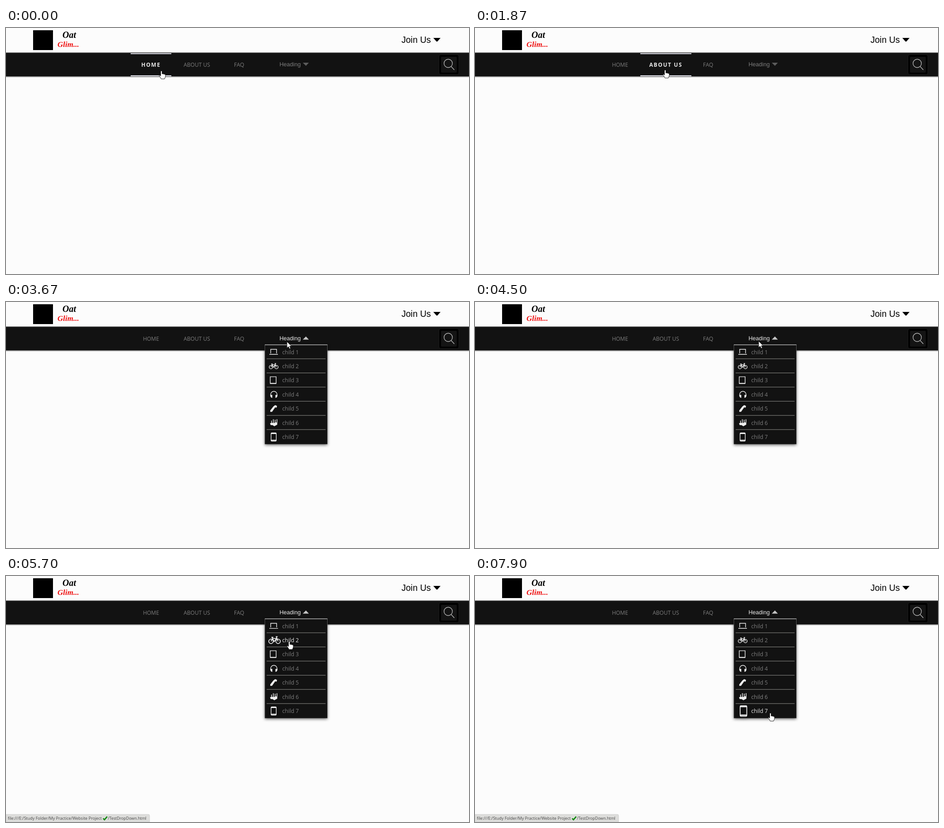
Write an HTML page that moves like this. It is 1025x546 px and loops after 8000 ms.

```html
<!DOCTYPE html>
<html lang="en">
<head>
<meta charset="utf-8">
<title>Navigation menu</title>
<style>
  html, body { margin: 0; width: 100%; height: 100%; overflow: hidden; background: #fcfcfc; }
  svg { display: block; width: 100%; height: 100%; }
  text { font-family: "Open Sans", "Noto Sans", sans-serif; font-size: 12px; white-space: pre; }
  .arial { font-family: "Liberation Sans", Arial, sans-serif; }
  .brand { font: italic bold 20px "Liberation Serif", serif; }
  .tab text { text-anchor: middle; }
  .row text { font-size: 12.1px; }
  #status text { font-size: 9px; fill: #444; }
  #menu rect { filter: drop-shadow(0 2px 3px #0009); }
  .line { fill: none; stroke: #eee; stroke-width: 1.4; }
</style>
</head>
<body>
<svg id="stage" viewBox="0 0 1025 546" preserveAspectRatio="none">
  <rect width="1025" height="546" fill="#fcfcfc"/>
  <rect x="60" y="5" width="44" height="44"/>
  <text class="brand" x="125" y="22">Oat</text>
  <text class="brand" x="114" y="42" fill="#e11" style="font-size:17px">Glim...</text>
  <text class="arial" x="875.5" y="33" style="font-size:19.5px">Join Us</text>
  <path d="M946 22H962L955 30H953Z"/>

  <rect y="108" width="1025" height="1.5" fill="#bbb"/>
  <rect y="54" width="1025" height="54" fill="#888"/>
  <rect y="55.3" width="1025" height="52" fill="#121212"/>
  <g id="tabs"></g>
  <text id="heading" class="arial" x="605.5" y="85" style="font-size:12.6px">Heading</text>
  <path id="caret"/>
  <rect x="958.5" y="59" width="44" height="44.5" rx="4" fill="#000" stroke="#292929" stroke-width=".7"/>
  <rect x="963" y="64" width="35" height="35" rx="2" fill="#141414"/>
  <g fill="none" stroke="#b5b5b5" stroke-width="1.4">
    <circle cx="979" cy="78.5" r="9.3"/>
    <path d="M985.5 85.5L992.5 93"/>
  </g>

  <g id="menu">
    <rect x="573" y="95" width="138.5" height="220.5" fill="#121212"/>
    <path d="M573 315V95H711.5V315" fill="none" stroke="#777" stroke-width=".7"/>
    <path d="M573 95H711.5" stroke="#ddd"/>
    <g id="rows"></g>
  </g>

  <g id="status">
    <path d="M0 529H315Q318 529 318 532V546H0Z" fill="#dddddb" stroke="#c4c4c4" stroke-width=".6"/>
    <text x="4" y="541">file:///E:/Study Folder/My Practice/Website Project</text>
    <path d="M215 538L218 541L224 534" fill="none" stroke="#138a13" stroke-width="2.8"/>
    <text x="225.5" y="541" style="font-size:8.8px">/TestDropDown.html</text>
  </g>

  <g id="cursor" stroke="#222" stroke-width="1" fill="#fff" stroke-linejoin="round">
    <path id="hand" d="M-1.5 1Q0 -1 1.5 1V7L3 6.5L4.5 7.3L6 7L7.3 8L9 8.2V13L7 18H-.5L-2 15L-5 11Q-4.5 9 -3 10L-1.5 11.5Z"/>
    <path id="arrow" d="M0 0V14L3.3 11L5.6 16L8 15L5.7 10H10Z"/>
  </g>
</svg>
<script>
const $ = id => document.getElementById(id);
const LOOP = 8000, FADE = 400;

// label, centre x, width, hover start, hover end
const tabs = [
  ["HOME", 321, 90, -1000, 1190],
  ["ABOUT US", 422.5, 113, 1190, 2455],
  ["FAQ", 516, 78, 2470, 3000]
];
const menuOpens = 3200, firstRowHover = 4900;
const rowStarts = [firstRowHover, 5400, 5960, 6585, 7040, 7260, 7640, 9000];

// Icons are centred vertically on y = 0.
const icons = [
  `<path class="line" d="M586 3V-6H599V3M583 5.3H602"/>`,
  `<g class="line" stroke-width="1"><circle cx="586.5" cy="2" r="3.8"/><circle cx="598.7" cy="2" r="3.8"/>
   <path d="M586.5 2L589.5 -3H596L592 2.5L589 -3L588 -5H590.5M598.7 2L595.5 -6H598"/></g>`,
  `<path class="line" d="M585 -8H598V7H585Z"/><path d="M585 6.8H598" stroke="#eee" stroke-width="2"/>`,
  `<path class="line" d="M586 3V0A7 7 0 0 1 600 0V3"/><path d="M585 1H589.5V7.5Q585 7 585 1M601 1H596.5V7.5Q601 7 601 1" fill="#eee"/>`,
  `<path d="M585 4L592 -5L596 -8L600 -6L599 -2L596 -3L589 7L585 7Z" fill="#eee"/>`,
  `<path d="M584.5 1L587 0V-5H588.5V0H591V-8H592.5V0H595V-7H596.5V-1H599V-8H600.5V4L594 7.5L590 5H586Z" fill="#eee"/>`,
  `<rect class="line" x="586.8" y="-9.2" width="11.5" height="18.4" rx="1.6"/><path d="M587 -7.5H598M587 7.2H598" stroke="#eee" stroke-width="2"/>`
];

// time, x, y of the pointer tip
const path = [
  [0, 344, 95], [70, 344, 95], [870, 359, 95], [1170, 363, 95], [1700, 415, 94],
  [1870, 421, 93], [2030, 428, 93], [2670, 505, 91], [2870, 528, 90], [3670, 622, 88],
  [4000, 626, 87], [4500, 628, 87], [4770, 628, 91], [4900, 628, 96], [5700, 627, 145],
  [6470, 627, 184], [6570, 627, 188], [6600, 627, 193], [6830, 628, 210], [6970, 630, 215],
  [7430, 648, 278], [7600, 650, 281], [7670, 652, 290], [7830, 653, 296], [7900, 654, 304]
];

const mix = (a, b, p) => a + (b - a) * p;
const grey = v => `rgb(${v},${v},${v})`;
const ease = p => 1 - (1 - Math.min(1, Math.max(0, p))) ** 2.3;
const hover = (t, start, end) => t < end ? ease((t - start) / FADE) : 1 - ease((t - end) / FADE);

function pointerAt(t) {
  const i = path.findIndex(key => key[0] > t);
  if (i < 0) return path[path.length - 1].slice(1);
  const [t0, x0, y0] = path[i - 1], [t1, x1, y1] = path[i];
  const p = (t - t0) / (t1 - t0);
  return [mix(x0, x1, p), mix(y0, y1, p)];
}

$("tabs").innerHTML = tabs.map(([label, x]) =>
  `<g class="tab"><text x="${x}" y="85.5">${label}</text><path stroke="#e4e4ee" stroke-width="2"/></g>`).join("");

$("rows").innerHTML = icons.map((icon, i) => {
  const separator = i < 6 ? `<path d="M577 15H707.5" stroke="#92928e"/>` : "";
  return `<g class="row" transform="translate(0 ${111 + i * 31.43})">
    <g class="icon">${icon}</g><text x="611.5" y="4.5">child ${i + 1}</text>${separator}</g>`;
}).join("");

const tabNodes = [...document.querySelectorAll(".tab")];
const rowNodes = [...document.querySelectorAll(".row")];

function draw(t) {
  tabs.forEach(([, x, width, start, end], i) => {
    const p = hover(t, start, end), half = width * p / 2;
    const [label, bars] = tabNodes[i].children;
    label.style.letterSpacing = 1.6 * p + "px";
    label.style.fontWeight = Math.round(mix(400, 700, p));
    label.style.fill = grey(mix(125, 232, p));
    bars.setAttribute("d", p > 0 ? `M${x - half} 57H${x + half}M${x - half} 106H${x + half}` : "");
  });

  const open = t >= menuOpens;
  $("menu").style.display = open ? "" : "none";
  $("heading").style.fill = grey(mix(125, 235, hover(t, menuOpens, LOOP * 2)));
  $("caret").setAttribute("d", open ? "M657 83.5H670.5L664 76.5Z" : "M657 77H670.5L664 84Z");
  $("caret").style.fill = open ? "#c4c4c4" : "#5c5c5c";

  rowNodes.forEach((row, i) => {
    const p = hover(t, rowStarts[i], rowStarts[i + 1]);
    row.querySelector(".icon").setAttribute("transform", `translate(586 0) scale(${1 + .3 * p}) translate(-586 0)`);
    row.querySelector("text").style.fill = grey(mix(125, 240, p));
  });

  const onRow = t >= firstRowHover;
  const useHand = t < 3000 || onRow;
  $("status").style.display = onRow ? "" : "none";
  $("hand").style.display = useHand ? "" : "none";
  $("arrow").style.display = useHand ? "none" : "";
  $("cursor").setAttribute("transform", `translate(${pointerAt(t)})`);
}

function tick() {
  draw(performance.now() % LOOP);
  requestAnimationFrame(tick);
}
tick();
</script>
</body>
</html>
```
